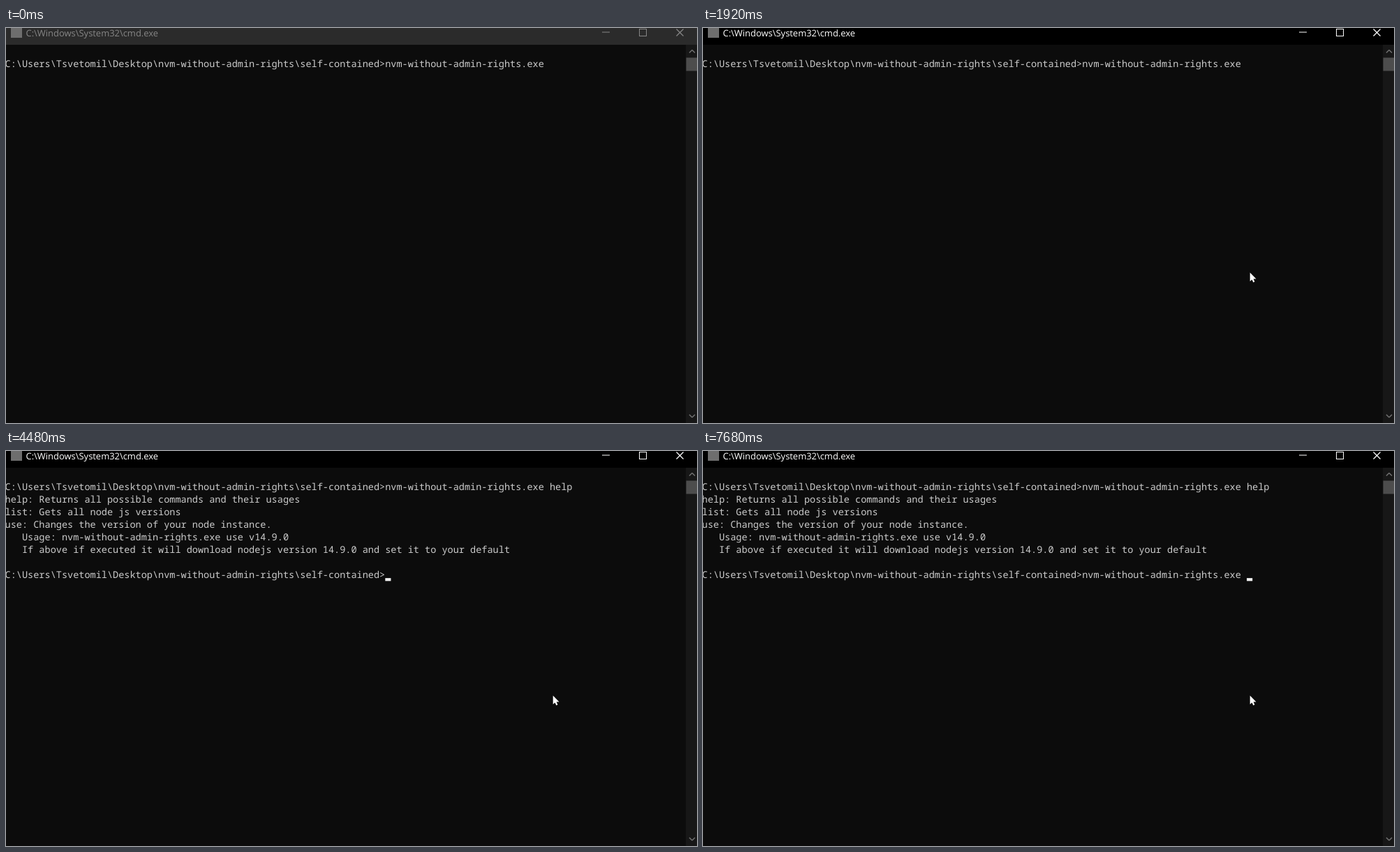
An HTML page with a canvas for the animation above (8 s loop, 990 by 566 pixels).

```html
<!DOCTYPE html>
<html lang="en">
<head>
<meta charset="utf-8">
<title>Terminal session</title>
<style>
  html, body { margin: 0; width: 100%; height: 100%; overflow: hidden; background: #0c0c0c; }
  canvas { display: block; }
</style>
</head>
<body>
<canvas width="990" height="566"></canvas>
<script>
const ctx = document.querySelector('canvas').getContext('2d', { alpha: false });
const LOOP = 8000, STEP = 80, BLINK = 526;
const LEFT = -1.4, FONT = 13.55, CELL = FONT * 0.6, ROW = 18.1;
const MOVE = 360, FOCUS = 840, SPACE = 3680, WORD = 3920, RUN = 4400, DONE = 4480;
const KEYS = [5320, 6120, 6280, 6560, 6880];   // recall, then four backspaces

const PROMPT = 'C:\\Users\\Tsvetomil\\Desktop\\nvm-without-admin-rights\\self-contained>';
const EXE = 'nvm-without-admin-rights.exe';
const COMMAND = EXE + ' help';
const TITLE = 'C:\\Windows\\System32\\cmd.exe';
const OUTPUT = [
  'help: Returns all possible commands and their usages',
  'list: Gets all node js versions',
  'use: Changes the version of your node instance.',
  '   Usage: ' + EXE + ' use v14.9.0',
  '   If above if executed it will download nodejs version 14.9.0 and set it to your default'
];

const clamp = (v, lo, hi) => Math.min(hi, Math.max(lo, v));
const beat = t => Math.floor((t - FOCUS) / BLINK);

function rect(color, x, y, w, h) {
  ctx.fillStyle = color;
  ctx.fillRect(x, y, w, h);
}

function segment(color, width, x1, y1, x2, y2) {
  ctx.strokeStyle = color;
  ctx.lineWidth = width;
  ctx.beginPath();
  ctx.moveTo(x1, y1);
  ctx.lineTo(x2, y2);
  ctx.stroke();
}

function text(str, x, y, font, color) {
  ctx.font = font;
  ctx.textRendering = 'geometricPrecision';
  ctx.fillStyle = color;
  ctx.fillText(str, x, y);
}

const line = (str, row) =>
  text(str, LEFT, 55.5 + row * ROW, `${FONT}px "Noto Sans Mono", monospace`, '#ccc');

const caret = (col, row) => rect('#f2f2f2', LEFT + col * CELL, 55.4 + row * ROW, CELL, 4.2);

function commandLine(typed, lit, row) {
  line(PROMPT + typed, row);
  if (lit) caret(PROMPT.length + typed.length, row);
}

function typeCommand(t) {
  const letters = clamp(Math.floor((t - WORD) / STEP) + 1, 0, 4);
  const count = t < SPACE ? 0 : 1 + letters;
  const lit = count > 0 || beat(t) % 2 === 1;
  commandLine(COMMAND.slice(0, EXE.length + count), lit, 0);
}

// Each key lights the caret; it then toggles on every beat.
function eraseCommand(t) {
  const pressed = KEYS.filter(k => k <= t).length;
  const lastKey = pressed ? KEYS[pressed - 1] : DONE + STEP;
  const typed = pressed ? COMMAND.slice(0, COMMAND.length + 1 - pressed) : '';
  commandLine(typed, t < lastKey || (beat(t) - beat(lastKey)) % 2 === 0, 7);
}

function terminal(t) {
  if (t < RUN) return typeCommand(t);
  line(PROMPT + COMMAND, 0);
  if (t < DONE) return caret(0, 1);
  OUTPUT.forEach((str, i) => line(str, i + 1));
  eraseCommand(t);
}

function titleBar(t) {
  const active = t >= FOCUS, ink = active ? '#fff' : '#868686';
  const running = t >= RUN && t < DONE;
  rect(active ? '#000' : '#2b2b2b', 0, 0, 990, 24);
  rect('#6e6e6e', 7, -1, 16, 15);
  text(TITLE + (running ? ` - ${EXE}  help` : ''), 28.5, 11.8,
    '12.95px "Open Sans", sans-serif', ink);
  segment(ink, 1, 854, 6, 865, 6);
  ctx.strokeRect(907.5, 1.5, 10, 10);
  for (const side of [-5, 5]) segment(ink, 1.3, 965.5 + side, 1.5, 965.5 - side, 11.5);
}

function scrollBar() {
  rect('#171717', 974, 24, 16, 542);
  rect('#4d4d4d', 974.5, 42.5, 15.5, 19);
  for (const [tip, dir] of [[31.5, 1], [558, -1]])
    for (const side of [-4, 4]) segment('#747474', 1.5, 983, tip, 983 + side, tip + 4 * dir);
}

function pointer(t) {
  if (t < MOVE) return;
  const left = 1 - clamp(Math.floor((t - MOVE) / STEP) / 3, 0, 1);
  const x = 783.7 + 138 * left ** 2, y = 350.6 + 201 * left ** 2;
  ctx.fillStyle = '#fff';
  ctx.fill(new Path2D(`M${x} ${y}v12.4l2.8 -2.6 1.9 4.1 2 -.9 -1.8 -4h3.9z`));
  if (t >= FOCUS && t < FOCUS + STEP) {
    ctx.beginPath();
    ctx.arc(783.3, 348.2, 13.6, 0, 2 * Math.PI);
    ctx.fillStyle = 'rgba(255, 255, 0, .5)';
    ctx.fill();
  }
}

function draw(t) {
  rect('#0c0c0c', 0, 0, 990, 566);
  terminal(t);
  titleBar(t);
  scrollBar();
  pointer(t);
}

const start = performance.now();
function tick() {
  draw((performance.now() - start) % LOOP);
  requestAnimationFrame(tick);
}
tick();
</script>
</body>
</html>
```
